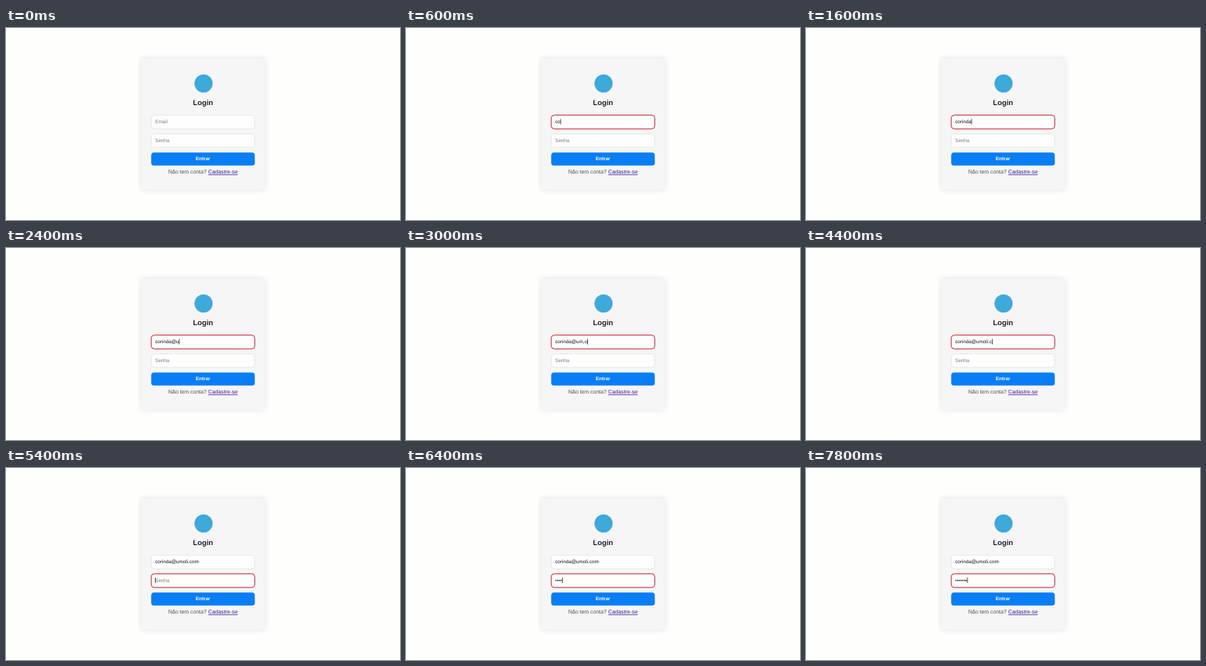
These frames come from a looping animation (500x244 px, 8000 ms). An HTML page with a canvas:

```html
<!DOCTYPE html>
<html lang="pt">
<head>
<meta charset="utf-8">
<title>Login</title>
<style>
html, body { margin: 0; width: 100%; height: 100%; overflow: hidden; background: #fefefd; }
canvas { display: block; width: 500px; height: 244px; }
</style>
</head>
<body>
<canvas id="stage"></canvas>
<script>
const W = 500, H = 244, LOOP = 8000, STEP = 200;
const FONT = '"Liberation Sans", Arial, sans-serif';
const canvas = document.getElementById('stage');
const ctx = canvas.getContext('2d');
const ratio = window.devicePixelRatio || 1;
canvas.width = W * ratio;
canvas.height = H * ratio;

// Runs of keystrokes: start time, then one key per step; '<' deletes, '_' hides the caret
const emailRuns = [[400, 'corinda'], [2000, '_@um,o<<oli.com']];
const passRuns = [[5600, '•••'], [6400, '•••'], [7600, '_•']];
const EMAIL_FOCUS = 200, PASS_FOCUS = 5400;

function typed(runs, t) {
  let text = '', caret = true;
  for (const [start, keys] of runs) {
    [...keys].forEach((key, i) => {
      if (t < start + i * STEP) return;
      caret = key !== '_';
      if (key === '<') text = text.slice(0, -1);
      else if (caret) text += key;
    });
  }
  return { text, caret };
}

function box(x, y, w, h, r, fill, stroke, line = 0.6) {
  ctx.beginPath();
  ctx.roundRect(x, y, w, h, r);
  if (fill) {
    ctx.fillStyle = fill;
    ctx.fill();
  }
  if (stroke) {
    ctx.strokeStyle = stroke;
    ctx.lineWidth = line;
    ctx.stroke();
  }
}

function label(text, x, y, size, color, align = 'left', weight = 400) {
  ctx.font = `${weight} ${size}px ${FONT}`;
  ctx.textAlign = align;
  ctx.fillStyle = color;
  ctx.fillText(text, x, y);
  return ctx.measureText(text).width;
}

function field(y, hint, { text, caret }, focused) {
  box(184.5, y + 0.4, 131.1, 17.1, 3.5, '#fefefd', '#dcdcdc');
  if (focused) box(184.25, y + 0.2, 131.5, 17.5, 4, null, '#d3202f', 0.95);
  const width = label(text || hint, 189.2, y + 10.4, 6.27, text ? '#111' : '#7c7c7c');
  if (focused && caret) {
    ctx.fillStyle = '#111';
    ctx.fillRect(189.2 + (text ? width : 0), y + 5, 0.7, 7);
  }
}

function card() {
  ctx.save();
  ctx.shadowColor = 'rgba(0, 0, 0, 0.12)';
  ctx.shadowBlur = 9 * ratio;
  box(172, 39, 156.5, 166.5, 3.5, '#f6f6f6');
  ctx.restore();

  ctx.beginPath();
  ctx.arc(250.7, 70.5, 11.5, 0, Math.PI * 2);
  ctx.fillStyle = '#3fa9d9';
  ctx.fill();

  label('Login', 250, 98, 9.4, '#222', 'center', 700);
  box(184.3, 158.2, 131.4, 16.6, 3.5, '#087df5');
  label('Entrar', 250, 168.1, 6.27, '#fff', 'center', 700);

  const x = 206.1, y = 185.4;
  const linkX = x + label('Não tem conta? ', x, y, 6.88, '#4c5058');
  const linkW = label('Cadastre-se', linkX, y, 6.88, '#3a1299');
  ctx.fillRect(linkX, y + 0.6, linkW, 0.7);
}

function draw(t) {
  ctx.setTransform(ratio, 0, 0, ratio, 0, 0);
  ctx.textRendering = 'geometricPrecision';
  ctx.fillStyle = '#fefefd';
  ctx.fillRect(0, 0, W, H);
  card();
  field(110.5, 'Email', typed(emailRuns, t), t >= EMAIL_FOCUS && t < PASS_FOCUS);
  field(134.2, 'Senha', typed(passRuns, t), t >= PASS_FOCUS);
}

const begin = performance.now();
function tick() {
  draw((performance.now() - begin) % LOOP);
  requestAnimationFrame(tick);
}
tick();
</script>
</body>
</html>
```
